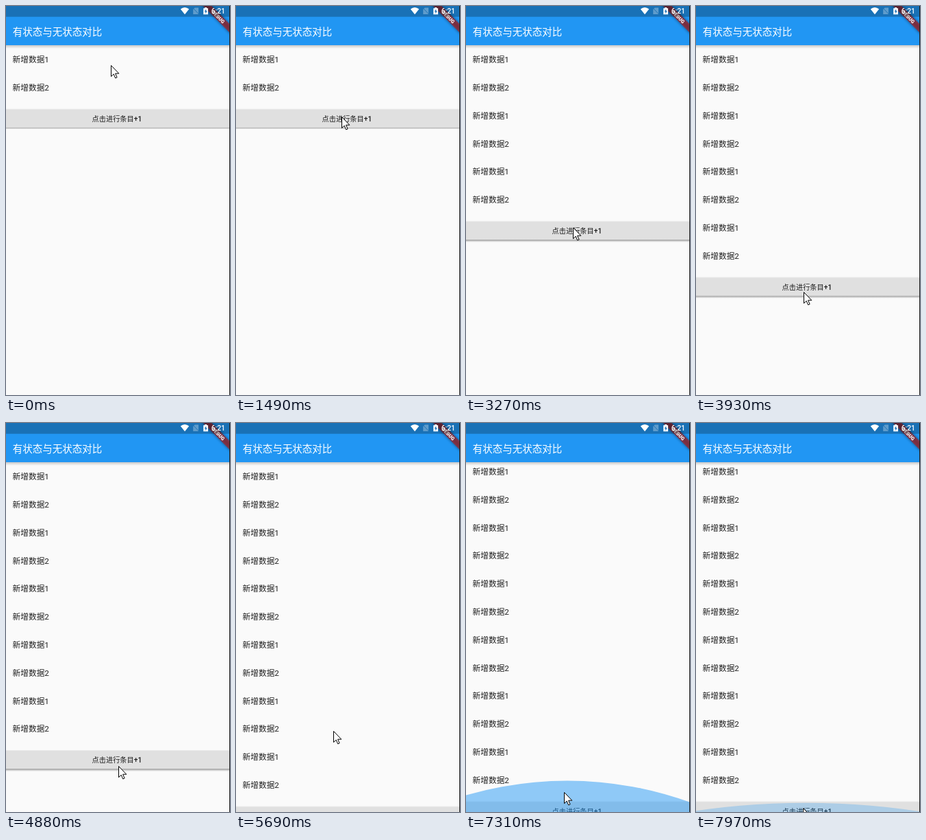
Animation, 327 px wide and 566 px high, one loop 8000 ms. Source, as an HTML page:

```html
<!DOCTYPE html>
<html lang="zh-CN">
<head>
<meta charset="utf-8">
<style>
html, body { margin: 0; width: 100%; height: 100%; overflow: hidden; background: #fafafa; }
svg { display: block; width: 327px; height: 566px; }
text { font-family: Roboto, "Noto Sans CJK SC", "Noto Sans CJK", "Noto Sans", sans-serif; }
#rows text { font-size: 11.7px; fill: #1f1f1f; }
</style>
</head>
<body>
<svg viewBox="0 0 327 566">
  <defs>
    <linearGradient id="shade" x2="0" y2="1">
      <stop offset="0" stop-opacity=".4"/>
      <stop offset="1" stop-opacity="0"/>
    </linearGradient>
    <filter id="soft" x="-20%" y="-100%" width="140%" height="300%">
      <feGaussianBlur stdDeviation="2"/>
    </filter>
  </defs>
  <rect width="327" height="566" fill="#fafafa"/>

  <g id="list">
    <g id="rows"></g>
    <g id="button">
      <rect y="-.8" width="326" height="1" opacity=".06"/>
      <rect id="drop" y="26.2" width="326" fill="url(#shade)"/>
      <rect width="326" height="26.3" fill="#e0e0e0"/>
      <rect id="press" width="326" height="26.3" fill="#bcbcbc"/>
      <text x="161.9" y="17.6" font-size="10.2" font-weight="500" text-anchor="middle" fill="#1f1f1f">点击进行条目+1</text>
    </g>
  </g>
  <ellipse id="glow" rx="489" fill="#2196f3"/>

  <rect y="57" width="326" height="5" fill="url(#shade)" opacity=".5"/>
  <rect width="326" height="57" fill="#2196f3"/>
  <text x="9.8" y="42.5" font-size="14.5" font-weight="500" fill="#fff">有状态与无状态对比</text>

  <g transform="translate(326 0) rotate(45)">
    <rect x="-30" y="18.2" width="60" height="8.8" opacity=".5" filter="url(#soft)"/>
    <rect x="-30" y="18.2" width="60" height="8.8" fill="#b71c1c" fill-opacity=".63"/>
    <text y="25.2" font-size="7.2" font-weight="900" text-anchor="middle" fill="#fff">DEBUG</text>
  </g>

  <rect width="326" height="15.7" opacity=".25"/>
  <g fill="#fff">
    <path d="M254.8 4.6Q261 -.4 267.2 4.6L261 12.3Z"/>
    <path d="M275.6 2.4H281V12H273.2V4.8Z" opacity=".3"/>
    <path d="M272.6 2.6L281.6 12" stroke="#1971b6" stroke-width=".9"/>
    <path d="M288.2 3.2H290.2V2H293V3.2H295V12.3H288.2Z"/>
    <path d="M292.2 4.4L289.6 8.3H291.2V11.2L293.7 7.2H292.2Z" fill="#1971b6"/>
    <text x="299.8" y="11.2" font-size="10.2" font-weight="500">6:21</text>
  </g>
  <rect x="326" width="1" height="566" fill="#1c1c1c"/>

  <path id="cursor" d="M.5 .5V16.6L4.2 13.1L6.7 18.9L9.1 17.9L6.6 12.2H11.8Z"
    fill="#fff" stroke="#000" stroke-width="1"/>
</svg>
<script>
const LOOP = 8000, PITCH = 40.8, ROWS = 12;
const $ = id => document.getElementById(id);
const set = (id, attrs) => {
  for (const k in attrs) $(id).setAttribute(k, attrs[k]);
};
// Progress from 0 to 1 between two times
const ramp = (t, from, to) => Math.min(1, Math.max(0, (t - from) / (to - from)));

// Each click adds two rows
const clicks = [2040, 2310, 3360, 4180, 5000];

// Pointer strokes: start, end, x, y reached
const home = [153, 86];
const strokes = [
  [520, 640, 150, 96], [910, 1030, 149, 101], [1340, 1490, 154, 161],
  [1920, 2430, 158, 247], [2580, 2970, 156, 322], [3360, 3630, 159, 457],
  [3630, 3930, 157, 416], [4180, 4450, 164, 499], [5150, 5690, 142, 448],
  [6410, 6800, 143, 558], [7070, 7310, 143, 537], [7430, 7970, 156, 560]
];

// Overscroll at the end of the list
const pulls = [
  { from: 5840, to: 6800, size: .89, alpha: .28, x: 155 },
  { from: 6920, to: 7850, size: .95, alpha: .51, x: 148 },
  { from: 7850, to: 8090, size: .43, alpha: .27, x: 160 }
];

for (let i = 0; i < ROWS; i++) {
  const row = document.createElementNS("http://www.w3.org/2000/svg", "text");
  row.setAttribute("x", 9.6);
  row.setAttribute("y", 82.2 + i * PITCH);
  row.textContent = "新增数据" + (i % 2 + 1);
  $("rows").append(row);
}

function drawList(t) {
  const count = 2 + 2 * clicks.filter(c => c <= t).length;
  [...$("rows").children].forEach((row, i) => {
    row.style.display = i < count ? "" : "none";
  });
  const raised = clicks.some(c => t >= c - 270 && t < c + 120);
  const lit = clicks.some(c => t >= c && t < c + 120);
  const scroll = 8 * ramp(t, 5840, 5990) - .8 * ramp(t, 6800, 6920);
  set("button", { transform: `translate(0 ${150.4 + (count - 2) * PITCH})` });
  set("drop", { height: raised ? 4 : 2.6 });
  set("press", { opacity: lit ? .3 : 0 });
  set("list", { transform: `translate(0 ${-scroll})` });
}

function drawGlow(t) {
  const pull = pulls.find(p => t >= p.from && t < p.to);
  if (!pull) return set("glow", { opacity: 0 });
  const wave = Math.sin(Math.PI * ramp(t, pull.from, pull.to));
  const size = pull.size * wave, ry = 489 * size;
  set("glow", { cx: pull.x, ry, cy: 580.8 - 65.5 * size + ry, opacity: pull.alpha * wave });
}

function drawCursor(t) {
  let [x, y] = home;
  for (const [from, to, nx, ny] of strokes) {
    const p = ramp(t, from, to);
    x += (nx - x) * p;
    y += (ny - y) * p;
  }
  set("cursor", { transform: `translate(${Math.round(x)} ${Math.round(y)})` });
}

const start = performance.now();
function frame() {
  const t = (performance.now() - start) % LOOP;
  drawList(t);
  drawGlow(t);
  drawCursor(t);
  requestAnimationFrame(frame);
}
frame();
</script>
</body>
</html>
```
